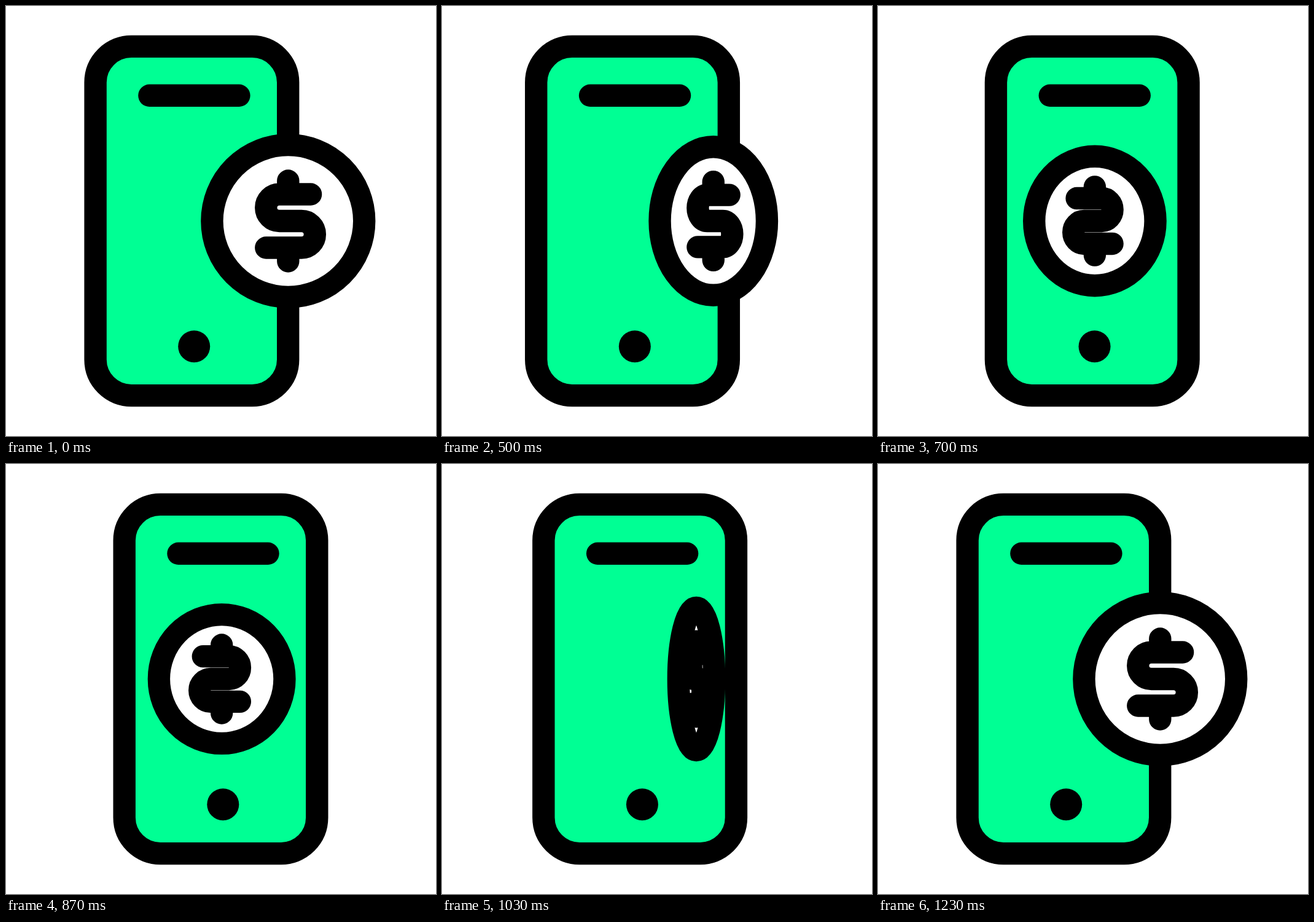
Write an HTML page with a canvas that moves like this. It is 700x700 px and loops after 1.4 s.

```html
<!DOCTYPE html>
<html lang="en">
<head>
<meta charset="utf-8">
<title>Mobile payment</title>
<style>
  html, body { margin: 0; width: 100%; height: 100%; overflow: hidden; background: #fff; }
  canvas { display: block; width: 100vw; height: 100vh; }
</style>
</head>
<body>
<canvas id="stage" width="700" height="700"></canvas>
<script>
const ctx = document.getElementById('stage').getContext('2d');
const LOOP = 1400, FPS = 30, INK = '#000', GREEN = '#00ff94', LINE = 36.4;

const mix = (a, b, p) => a + (b - a) * p;

// cubic-bezier(.75, 0, .25, 1)
function ease(x) {
  if (x <= 0) return 0;
  if (x >= 1) return 1;
  let lo = 0, hi = 1;
  for (let i = 0; i < 30; i++) {
    const s = (lo + hi) / 2, r = 1 - s;
    const bx = 3 * r * r * s * 0.75 + 3 * r * s * s * 0.25 + s * s * s;
    if (bx < x) lo = s; else hi = s;
  }
  return lo * lo * (3 - 2 * lo);
}

// 0: coin beside the phone, 1: coin flipped and centred
function progress(ms) {
  const n = Math.floor((Math.floor(ms / 10) * 10 + 3.4) * FPS / 1000);
  return ease((n - 10) / 13.5) - ease((n - 24.45) / 12.55);
}

function phone(x) {
  ctx.save();
  ctx.translate(x, 350);
  ctx.beginPath();
  ctx.roundRect(-156.8, -284.1, 313.6, 568.2, 58.5);
  ctx.fillStyle = GREEN;
  ctx.fill();
  ctx.stroke();

  ctx.beginPath();
  ctx.moveTo(-69, -204.2);
  ctx.lineTo(77, -204.2);
  ctx.stroke();

  ctx.beginPath();
  ctx.arc(3.8, 204.2, 26, 0, Math.PI * 2);
  ctx.fillStyle = INK;
  ctx.fill();
  ctx.restore();
}

// Scales the path only, so line width stays constant
function scaledPath(x, sx, sy, build) {
  ctx.save();
  ctx.translate(x, 350);
  ctx.scale(sx, sy);
  ctx.beginPath();
  build();
  ctx.restore();
}

function dollar() {
  const h = 43.5, r = h / 2, q = Math.PI / 2;
  ctx.moveTo(36.8, -h);
  ctx.lineTo(-14.3, -h);
  ctx.arc(-14.3, -r, r, -q, q, true);
  ctx.lineTo(21.8, 0);
  ctx.arc(21.8, r, r, -q, q);
  ctx.lineTo(-36, h);
  for (const d of [-1, 1]) {
    ctx.moveTo(0, d * 65.5);
    ctx.lineTo(0, d * h);
  }
}

function coin(x, sx, sy) {
  scaledPath(x, sx, sy, () => ctx.arc(0, 0, 123.9, 0, Math.PI * 2));
  ctx.fillStyle = '#fff';
  ctx.fill();
  ctx.stroke();
  scaledPath(x, sx, sy, dollar);
  ctx.stroke();
}

function draw(ms) {
  const p = progress(ms);
  ctx.fillStyle = '#fff';
  ctx.fillRect(0, 0, 700, 700);
  ctx.strokeStyle = INK;
  ctx.lineWidth = LINE;
  ctx.lineCap = ctx.lineJoin = 'round';
  phone(mix(302.4, 350, p));
  coin(mix(459.3, 350, p), mix(1, -0.845, p), mix(1, 0.845, p));
}

const start = performance.now();
function tick() {
  draw((performance.now() - start) % LOOP);
  requestAnimationFrame(tick);
}
tick();
</script>
</body>
</html>
```
